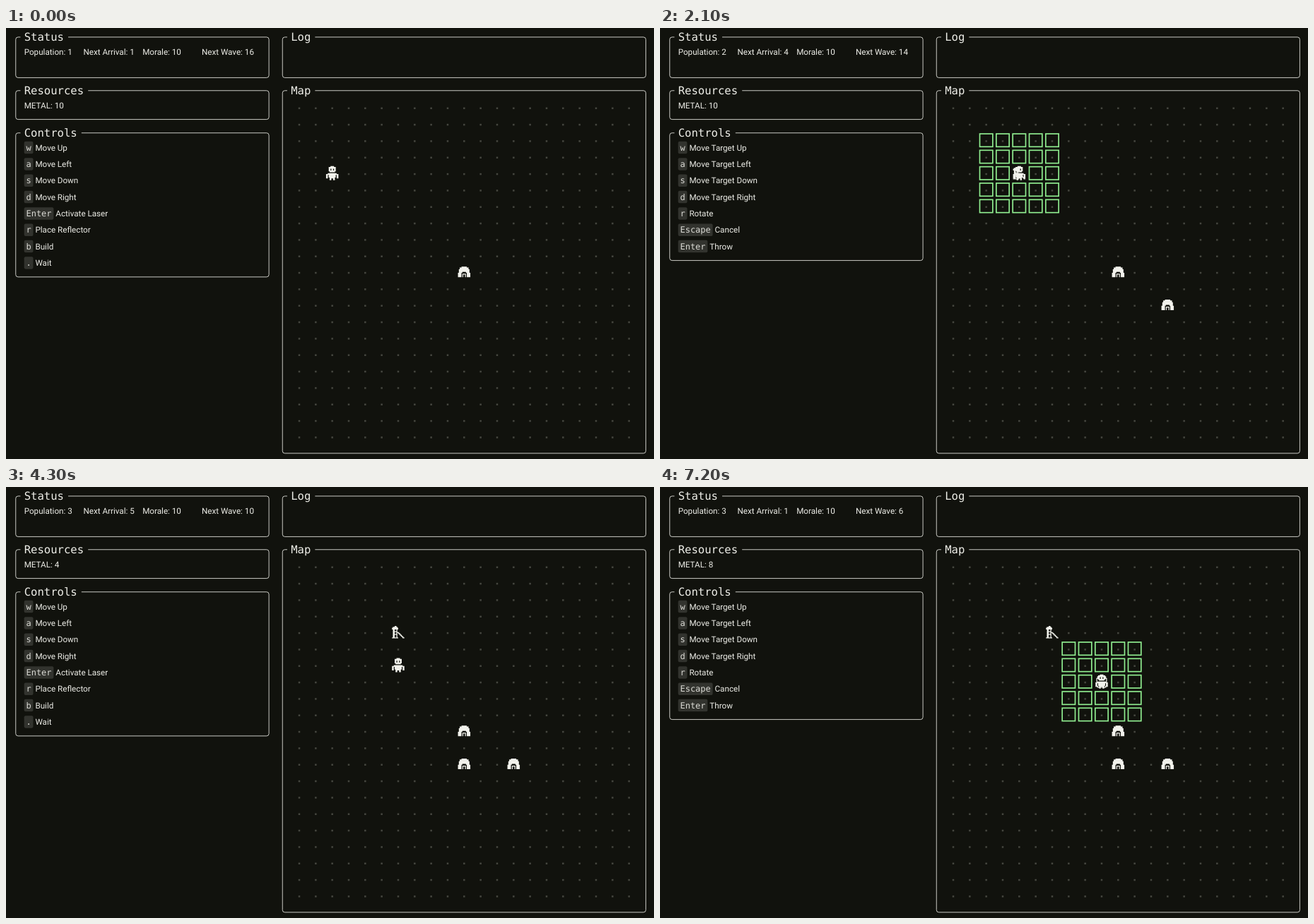
These frames come from a looping animation (917x611 px, 8000 ms). An HTML page:

```html
<!DOCTYPE html>
<html lang="en">
<head>
<meta charset="utf-8">
<title>Colony map</title>
<style>
  html, body { margin: 0; width: 100%; height: 100%; overflow: hidden; background: #11120d; }
  svg { display: block; }
  text { font: 14px Roboto, sans-serif; fill: #eeeee8; white-space: pre; text-rendering: geometricPrecision; }
  .title { font: 18.72px "DejaVu Sans Mono", monospace; }
  .key { font: 14.4px "DejaVu Sans Mono", monospace; fill: #dcdcd6; }
  .cap { fill: #32332e; }
  .line { fill: none; stroke: #eeeee8; }
  .target { fill: none; stroke: #90ee90; stroke-width: 2; }
  .dot { fill: #45463f; }
  .sprite { fill: #f2f2ec; fill-rule: evenodd; }
</style>
</head>
<body>
<!-- The interface is laid out at 6/5 of the stage size -->
<svg id="stage" width="917" height="611" viewBox="0 0 1100.4 733.2"></svg>
<script>
const LOOP = 8000, CELL = 28, PIXEL = 1.5, TEXT_X = 30.8;

// Sprites on a 16 x 16 pixel tile
const SPRITES = {
  robot: 'M6 0h4v1h2v5h-1v1h-6v-1h-1v-5h2zM6 3h1v2h-1zM9 3h1v2h-1z' +
    'M3 8h10v1h2v5h-2v-4h-1v3h-1v3h-2v-2h-2v2h-2v-3h-1v-3h-1v4h-2v-5h2z',
  house: 'M5 2h6v1h2v2h1v4h1v5h-14v-5h1v-4h1v-2h2z' +
    'M5 14v-5h1v-1h4v1h1v5h-1v-4h-4v4zM7 14v-3h2v3z',
  mine: 'M4 1h2v1h1v1h1v2h-1v9h1v1h-7v-1h1v-9h-1v-2h1v-1h2z' +
    'M4 5h2v2h-2zM4 8h2v2h-2zM4 11h2v3h-2z' +
    'M7 8h2v1h1v1h1v1h1v1h1v1h1v1h1v1h-2v-1h-1v-1h-1v-1h-1v-1h-1v-1h-1v-1h-1z',
  shell: 'M5 1h6v1h2v2h1v10h-1v1h-10v-1h-1v-10h1v-2h2z' +
    'M5 2v1h-1v2h-1v8h1v1h8v-1h1v-8h-1v-2h-1v-1z'
};

const CONTROLS = {
  main: ['w Move Up', 'a Move Left', 's Move Down', 'd Move Right',
    'Enter Activate Laser', 'r Place Reflector', 'b Build', '. Wait'],
  build: ['Escape Close', 's Splitter (3 METAL)', 'w Wall (1 METAL)',
    'r Residence (5 METAL)', 'm Mine (10 METAL)', 'p Projector (5 METAL)'],
  aim: ['w Move Target Up', 'a Move Target Left', 's Move Target Down',
    'd Move Target Right', 'r Rotate', 'Escape Cancel', 'Enter Throw']
};
const MODES = [[0, 'main'], [1200, 'build'], [2100, 'aim'], [3300, 'main'],
  [5600, 'build'], [7200, 'aim']];

// Each move is one turn: time, column, row
const MOVES = [[0, 2, 4], [100, 3, 4], [200, 4, 4], [3700, 4, 5], [3900, 4, 6],
  [4100, 5, 6], [4300, 6, 6], [4500, 7, 6], [4700, 8, 6], [4800, 9, 6], [5200, 9, 7]];
const HOUSES = [[10, 10], [13, 12], [10, 12]];
const MINE = [6, 4];

const cellX = col => 498 + CELL * col;
const cellY = row => 135 + CELL * row;
const lastIndex = (list, t) => list.filter(item => item[0] <= t).length - 1;

const text = (x, y, value, cls = '') => `<text x="${x}" y="${y}" class="${cls}">${value}</text>`;
const box = (x, y, w, h, cls, r = 0) =>
  `<rect x="${x}" y="${y}" width="${w}" height="${h}" rx="${r}" class="${cls}"/>`;
const sprite = (name, [col, row]) =>
  `<path class="sprite" d="${SPRITES[name]}" transform="translate(${cellX(col) - 8 * PIXEL} ${cellY(row) - 8 * PIXEL}) scale(${PIXEL})"/>`;

function panel(title, left, top, right, bottom) {
  const gapEnd = left + 21.5 + 11.27 * title.length;
  return `<path class="line" d="M${gapEnd} ${top}H${right - 4}q4 0 4 4V${bottom - 4}q0 4 -4 4` +
    `H${left + 4}q-4 0 -4 -4V${top + 4}q0 -4 4 -4h4"/>` +
    text(left + 14.3, top + 6.2, title, 'title');
}

function control(label, i) {
  const [key, ...words] = label.split(' ');
  const width = 8.67 * key.length + 6.7, y = 208.6 + CELL * i;
  return box(TEXT_X, y - 15.6, width, 21, 'cap', 2.5) + text(TEXT_X + 3.35, y, key, 'key') +
    text(TEXT_X + width + 3.5, y, words.join(' '));
}

function map(t, turn, mode, houses) {
  const player = MOVES[turn].slice(1);
  const things = [['robot', player], ...houses.map(at => ['house', at])];
  if (t >= 3300) things.push(['mine', MINE]);
  const taken = new Set(things.map(([, at]) => at.join()));
  let out = '';
  for (let row = 0; row < 21; row++)
    for (let col = 0; col < 21; col++)
      if (!taken.has([col, row].join()))
        out += box(cellX(col) - PIXEL, cellY(row), 2 * PIXEL, 2 * PIXEL, 'dot');
  out += things.map(thing => sprite(...thing)).join('');
  if (mode !== 'aim') return out;

  const [px, py] = player;
  for (let dy = -2; dy <= 2; dy++)
    for (let dx = -2; dx <= 2; dx++)
      if (dx || dy)
        out += box(cellX(px + dx) - 11, cellY(py + dy) - 11, 22, 22, 'target');
  const shift = t < 3300 ? (t >= 2700) + (t >= 2900) : 0;
  return out + sprite(t < 3300 ? 'mine' : 'shell', [px + shift, py]);
}

function scene(t) {
  const turn = lastIndex(MOVES, t);
  const mode = MODES[lastIndex(MODES, t)][1];
  const controls = CONTROLS[mode];
  const population = 1 + Math.ceil(turn / 5);
  const status = [`Population: ${population}`, `Next Arrival: ${5 - (turn + 4) % 5}`,
    'Morale: 10', `Next Wave: ${16 - turn}`];

  return panel('Status', 16.5, 15.5, 446.5, 84.5) +
    panel('Log', 469.5, 15.5, 1086.5, 84.5) +
    panel('Resources', 16.5, 106.5, 446.5, 155.5) +
    panel('Controls', 16.5, 178.5, 446.5, 199.5 + CELL * controls.length) +
    panel('Map', 469.5, 106.5, 1086.5, 723.5) +
    status.map((value, i) => text(TEXT_X + 100.5 * i, 45.6, value)).join('') +
    text(TEXT_X, 136.6, `METAL: ${t < 3300 ? 10 : turn - 2}`) +
    controls.map(control).join('') +
    map(t, turn, mode, HOUSES.slice(0, population));
}

const stage = document.getElementById('stage');
let shown = '';
function draw() {
  const next = scene(performance.now() % LOOP);
  if (next !== shown) stage.innerHTML = shown = next;
  requestAnimationFrame(draw);
}
draw();
</script>
</body>
</html>
```
